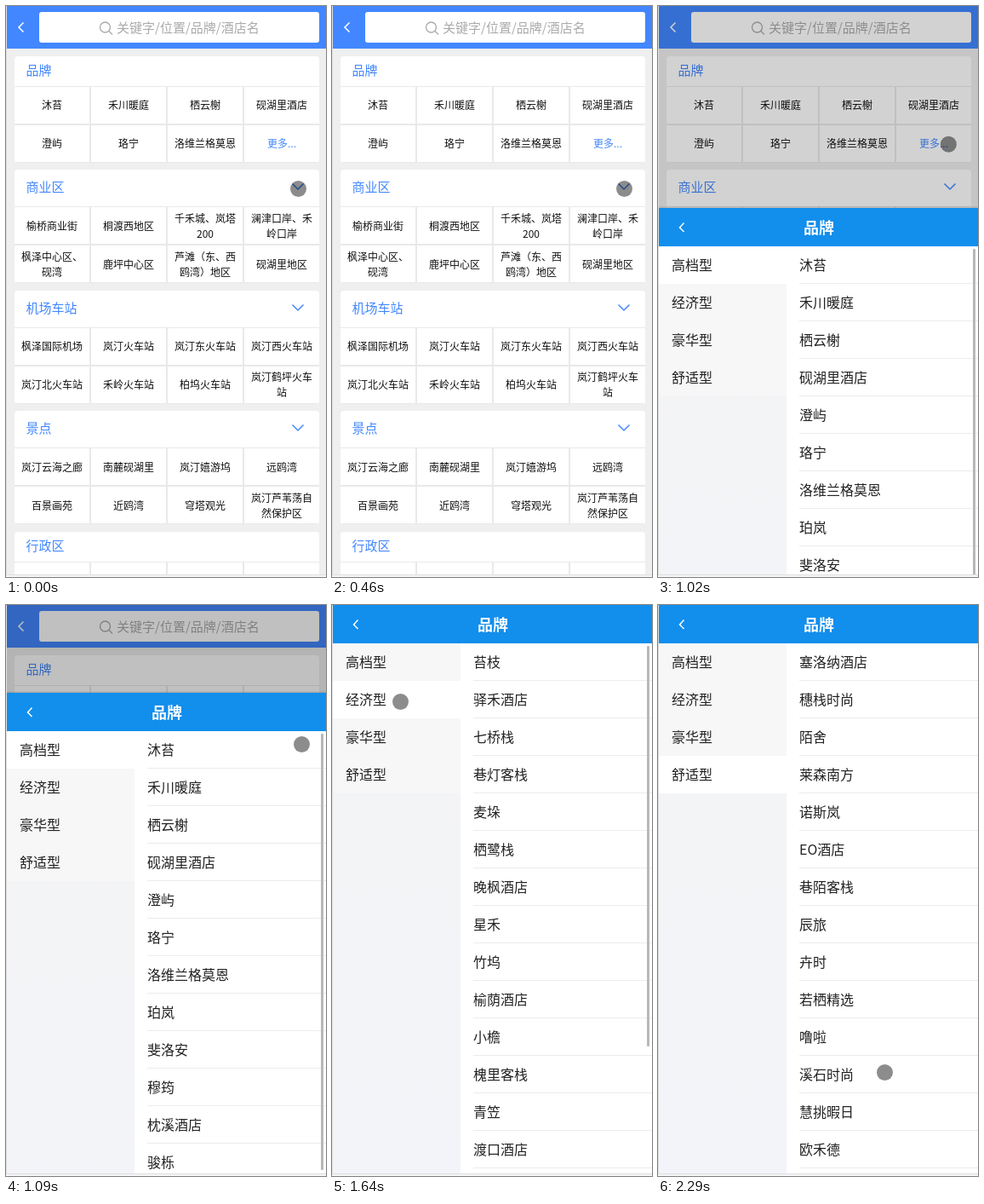
An HTML page that plays this animation: 376x670 px, repeating every 2.37 s.

```html
<!DOCTYPE html>
<html lang="zh-CN">
<head>
<meta charset="utf-8">
<style>
* { box-sizing: border-box; }
html, body { margin: 0; width: 100%; height: 100%; overflow: hidden; background: #f6f6f6; }
body { position: relative; font-family: "Noto Sans CJK SC", "Noto Sans CJK", sans-serif; font-weight: 300; color: #222; }
svg { position: absolute; fill: none; stroke-width: 1.5; }
#app { position: absolute; left: 0; top: 0; width: 376px; height: 667px; overflow: hidden; background: #efefef; }
#edge { position: absolute; left: 0; top: 0; width: 376px; height: 668px; border: solid #dedede; border-width: 0 0 1px 1px; }
#bar { position: absolute; width: 376px; height: 50px; background: #4287ff; }
#search { position: absolute; left: 39px; top: 7px; width: 329px; height: 36px; border-radius: 3px; background: #fff;
  padding-left: 91px; font-size: 15px; line-height: 36px; color: #aaa; white-space: nowrap; }
#cards { position: absolute; left: 10px; top: 58.6px; width: 358px; }
.card { margin-bottom: 8.5px; border-radius: 4px; overflow: hidden; background: #fff; position: relative; }
.title { height: 35px; padding-left: 13.5px; font-size: 15px; line-height: 31px; color: #4287ff; }
.fold .title { height: 43px; line-height: 40px; }
.fold svg { left: 325px; top: 13px; stroke: #4287ff; }
.grid { display: grid; grid-template-columns: repeat(4, 88px); grid-auto-rows: 43px; gap: 2px; padding: 1px 0; background: #e9e9e9; }
.cell { display: flex; align-items: center; justify-content: center; padding: 0 4px; background: #fff;
  font-size: 12px; line-height: 18px; text-align: center; color: #111; }
.more { color: #4287ff; }
.extra { display: none; }
.open .extra { display: flex; }
.open svg { transform: rotate(180deg); }
#mask { position: absolute; inset: 0; background: #000; }
#sheet { position: absolute; left: 0; top: 0; width: 376px; height: 667px; background: #fff; box-shadow: 0 0 3px rgba(0,0,0,.3); }
#head { height: 45px; background: #128eec; color: #fff; font-size: 18px; font-weight: 700; line-height: 45px; padding-left: 171px; }
#tabs { position: absolute; top: 45px; width: 151px; height: 622px; background: linear-gradient(#f4f4f4, #f2f4f9); }
#list { position: absolute; top: 45px; left: 166px; width: 210px; }
#tabs div, #list div { height: 44px; font-size: 16px; line-height: 43px; white-space: nowrap; }
#tabs div { padding-left: 16px; background: #f7f7f7; }
#tabs .on { background: #fff; }
#list div { border-bottom: 1px solid #ececec; }
#thumb { position: absolute; left: 370px; top: 48px; width: 3px; border-radius: 1px; background: #b8b8b8; }
#dot { position: absolute; left: -9.5px; top: -9.5px; width: 19px; height: 19px; border-radius: 50%; background: rgba(0,0,0,.45); }
</style>
</head>
<body>
<div id="app">
  <div id="bar">
    <svg style="left:12px;top:17px" width="12" height="16" stroke="#fff"><path d="M8.5 2.5 3 8l5.5 5.5"/></svg>
    <div id="search">关键字/位置/品牌/酒店名</div>
    <svg style="left:109px;top:17px;stroke-width:1.3" width="18" height="18" stroke="#aaa"><circle cx="7.5" cy="8" r="6"/><path d="M12 12.5 16 16.5"/></svg>
  </div>
  <div id="cards"></div>
  <div id="mask"></div>
  <div id="sheet">
    <svg style="left:22px;top:15px" width="12" height="16" stroke="#fff"><path d="M8.5 2.5 3.5 8l5 5"/></svg>
    <div id="head">品牌</div>
    <div id="tabs"></div>
    <div id="list"></div>
    <div id="thumb"></div>
  </div>
</div>
<div id="edge"></div>
<div id="dot"></div>
<script>
const $ = id => document.getElementById(id);
const LOOP = 2370;

// title, cells, foldable
const sections = [
  ['品牌', '沐苔 禾川暖庭 栖云榭 砚湖里酒店 澄屿 珞宁 洛维兰格莫恩 更多...', false],
  ['商业区', '榆桥商业街 桐渡西地区 千禾城、岚塔200 澜津口岸、禾岭口岸 枫泽中心区、砚湾 鹿坪中心区 芦滩（东、西鸥湾）地区 砚湖里地区 ' +
    '柏坞商业街 槐岸地区 鹤坪中心区 桐渡东地区 榆桥老街 鹿坪新城 禾岭公园 澜津码头 枫泽西地区 芦滩商圈 柏坞地区 鹤坪广场', true],
  ['机场车站', '枫泽国际机场 岚汀火车站 岚汀东火车站 岚汀西火车站 岚汀北火车站 禾岭火车站 柏坞火车站 岚汀鹤坪火车站', true],
  ['景点', '岚汀云海之廊 南麓砚湖里 岚汀嬉游坞 远鸥湾 百景画苑 近鸥湾 穹塔观光 岚汀芦苇荡自然保护区', true],
  ['行政区', '枫泽区 禾岭区 鹿坪区 芦滩区', false]
];

// name, entries, scroll thumb length
const tabs = [
  ['高档型', '沐苔 禾川暖庭 栖云榭 砚湖里酒店 澄屿 珞宁 洛维兰格莫恩 珀岚 斐洛安 穆筠 枕溪酒店 骏栎 棠屿酒店 洛贝恩', 512],
  ['经济型', '苔枝 驿禾酒店 七桥栈 巷灯客栈 麦垛 栖鹭栈 晚枫酒店 星禾 竹坞 榆荫酒店 小檐 槐里客栈 青笠 渡口酒店', 470],
  ['豪华型', '穹岳 QK穹岳 瑟莱恩 莫维拉斯 璟岑阁 银穗暇日 柏澜霁空 珑曜 奥维森酒店 朵兰米拉 奥维森棠林 穹洋酒店 珀西兰尔登 穹岳行政公寓', 395],
  ['舒适型', '塞洛纳酒店 穗栈时尚 陌舍 莱森南方 诺斯岚 EO酒店 巷陌客栈 辰旅 卉时 若栖精选 噜啦 溪石时尚 慧挑暇日 欧禾德', 0]
];

// moments at which the screen refreshes
const ticks = [0, 80, 460, 600, 690, 770, 930, 1020, 1090, 1170, 1250, 1330, 1400, 1480,
  1560, 1640, 1730, 1810, 1890, 1970, 2050, 2130, 2210, 2290];

// pointer path: time, x, y
const path = [[0, 343, 214], [520, 343, 214], [770, 333, 160], [930, 333, 160], [1090, 347, 163], [1170, 332, 161],
  [1400, 139, 130], [1560, 86, 111], [1640, 80, 113], [1810, 72, 155], [1890, 71, 164], [1970, 72, 193],
  [2050, 72, 198], [2130, 112, 275], [2290, 266, 548]];

const chevron = '<svg width="16" height="14"><path d="M1.5 3.5 8 10 14.5 3.5"/></svg>';
const cell = (name, i) =>
  `<div class="cell${i > 7 ? ' extra' : ''}${name === '更多...' ? ' more' : ''}">${name}</div>`;

$('cards').innerHTML = sections.map(([title, cells, fold]) =>
  `<div class="card${fold ? ' fold' : ''}"><div class="title">${title}</div>${fold ? chevron : ''}` +
  `<div class="grid">${cells.split(' ').map(cell).join('')}</div></div>`).join('');
$('tabs').innerHTML = tabs.map(([name]) => `<div>${name}</div>`).join('');

const clamp = v => Math.min(1, Math.max(0, v));

function pointer(t) {
  const i = path.findLastIndex(p => p[0] <= t);
  const a = path[i], b = path[i + 1] || a;
  const k = a === b ? 0 : (t - a[0]) / (b[0] - a[0]);
  return [a[1] + (b[1] - a[1]) * k, a[2] + (b[2] - a[2]) * k];
}

let shown = -1;
function selectTab(n) {
  if (n === shown) return;
  shown = n;
  [...$('tabs').children].forEach((el, i) => el.classList.toggle('on', i === n));
  $('list').innerHTML = tabs[n][1].split(' ').map(s => `<div>${s}</div>`).join('');
  $('thumb').style.height = tabs[n][2] + 'px';
}

function draw(t) {
  $('cards').children[1].classList.toggle('open', t >= 80 && t < 460);
  const rise = 1 - (1 - clamp((t - 881) / 344)) ** 2;
  $('sheet').style.transform = `translateY(${Math.round(667 * (1 - rise))}px)`;
  $('sheet').style.visibility = rise ? 'visible' : 'hidden';
  $('mask').style.opacity = .3 * rise ** 1.2;
  selectTab(t < 1560 ? 0 : t < 1810 ? 1 : t < 2050 ? 2 : 3);
  $('thumb').style.opacity = t < 1560 ? 1 - clamp((t - 1300) / 180) : 1;
  const [x, y] = pointer(t);
  $('dot').style.transform = `translate(${x}px, ${y}px)`;
}

const start = performance.now();
function loop() {
  const t = (performance.now() - start) % LOOP;
  draw(ticks.findLast(k => k <= t));
  requestAnimationFrame(loop);
}
loop();
</script>
</body>
</html>
```
